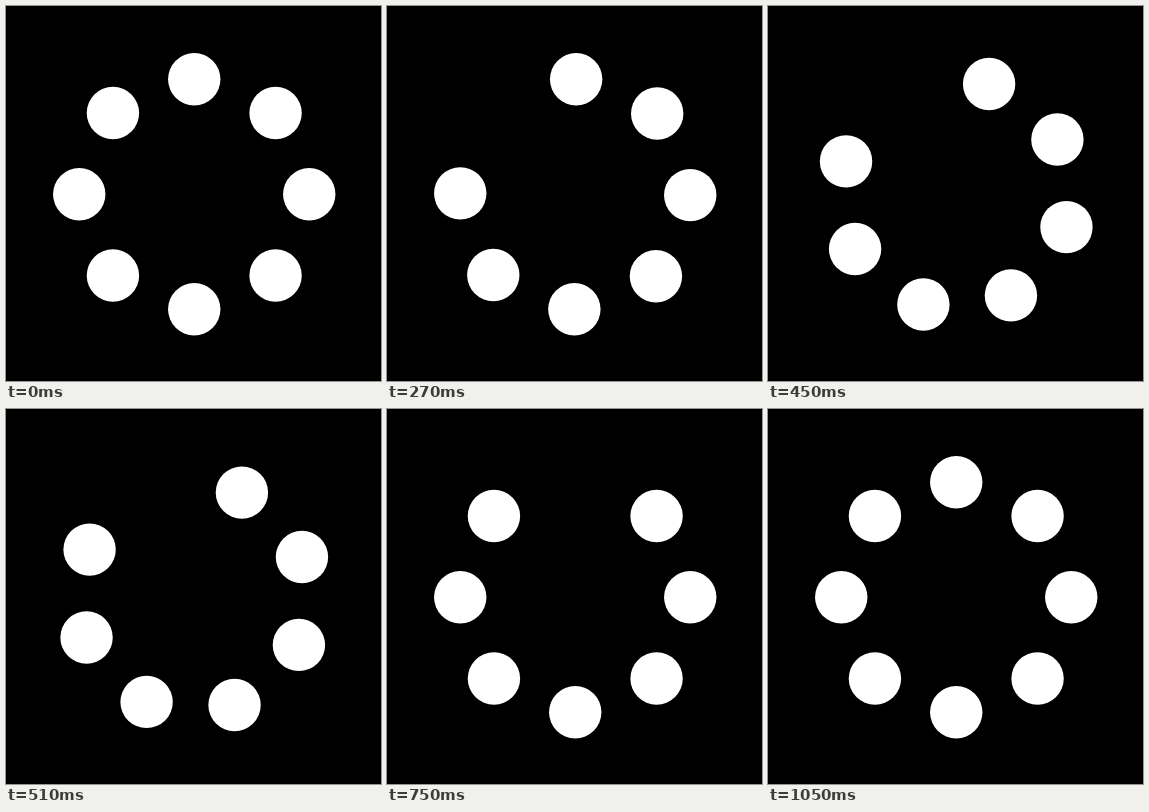
These frames come from a looping animation (375 by 375 pixels, 1.2 s). An HTML page:

```html
<!DOCTYPE html>
<html lang="en">
<head>
<meta charset="utf-8">
<title>Dot ring loader</title>
<style>
  html, body { margin: 0; width: 100%; height: 100%; overflow: hidden; background: #000; }
  svg { display: block; width: 100vw; height: 100vh; }
</style>
</head>
<body>
<svg viewBox="0 0 375 375" fill="#fff"></svg>
<script>
  const LOOP = 1200, STEP = 30;
  const CENTER = 188.25, RING = 115, DOT = 26.2, COUNT = 8;
  const svg = document.querySelector('svg');

  function addDot() {
    const dot = document.createElementNS('http://www.w3.org/2000/svg', 'circle');
    return svg.appendChild(dot);
  }

  function place(dot, x, y, r) {
    dot.setAttribute('cx', x);
    dot.setAttribute('cy', y);
    dot.setAttribute('r', r);
  }

  // Eased progress from 0 to 1 between two times
  function ease(t, from, to) {
    const p = Math.min(1, Math.max(0, (t - from) / (to - from)));
    return p * p * (3 - 2 * p);
  }

  const ring = Array.from({ length: COUNT }, addDot);
  const drop = addDot();

  function draw(t) {
    const turn = ease(t, 240, 750);
    ring.forEach((dot, i) => {
      const angle = (i + turn) * 2 * Math.PI / COUNT;
      // The last dot, at the upper left, shrinks away
      const size = i === COUNT - 1 ? 1 - ease(t, 0, 120) : 1;
      place(dot, CENTER + RING * Math.sin(angle), CENTER - RING * Math.cos(angle), DOT * size);
    });

    // A new dot falls into the gap at the top
    const top = CENTER - RING, start = -DOT - 1;
    place(drop, CENTER, start + (top - start) * ease(t, 900, 1050), DOT);
  }

  function tick() {
    const t = performance.now() % LOOP;
    draw(Math.floor(t / STEP) * STEP);
    requestAnimationFrame(tick);
  }
  tick();
</script>
</body>
</html>
```
